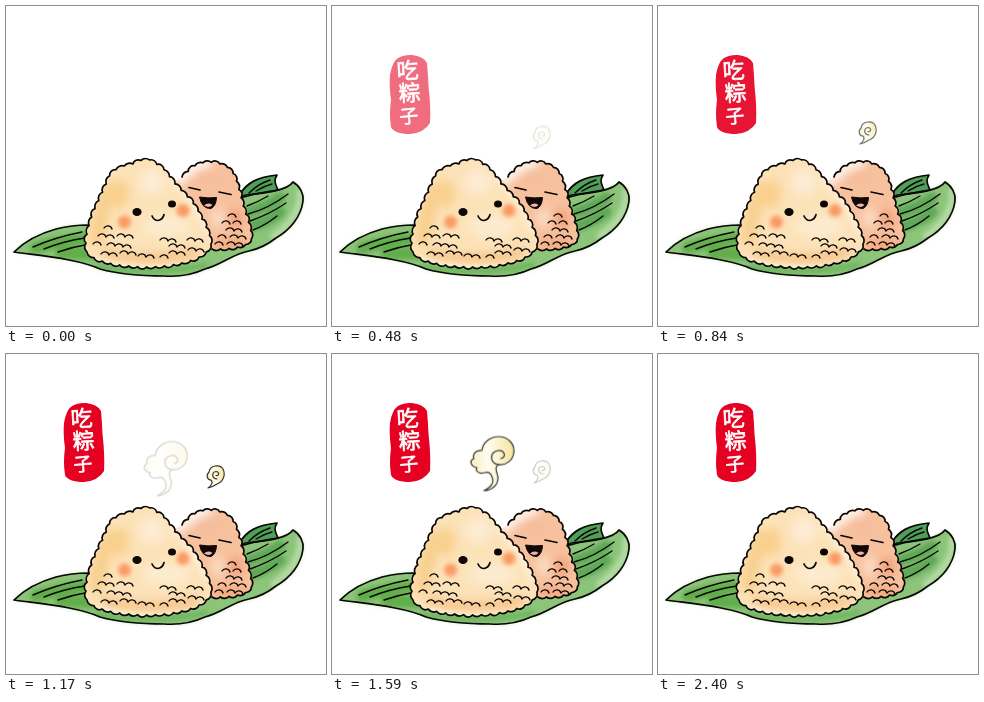
Write an HTML page that moves like this. It is 320 by 320 pixels and loops after 2730 ms.

```html
<!DOCTYPE html>
<html lang="zh">
<head>
<meta charset="utf-8">
<title>吃粽子</title>
<style>
  html, body { margin: 0; width: 100%; height: 100%; overflow: hidden; background: #fff; }
  svg { display: block; width: 100vw; height: 100vh; }
  .ink { fill: none; stroke: #080604; stroke-width: 1.7; stroke-linecap: round; stroke-linejoin: round; }
  .thin { stroke-width: 1.4; }
  .steam path { stroke: #3a372c; stroke-width: 1.2; stroke-linecap: round; stroke-linejoin: round; }
  .stamp text {
    font: 500 22px "Noto Sans CJK SC", "Noto Sans CJK", sans-serif;
    fill: #fff; stroke: #fff; stroke-width: .7; stroke-linejoin: round; text-anchor: middle;
  }
  .stamp, .steam { animation: 2730ms linear infinite both; }
  .stamp { animation-name: stamp; }
  .small { animation-name: small; }
  .big { animation-name: big; }
  @keyframes stamp {
    0%, 3.3% { opacity: 0; animation-timing-function: cubic-bezier(.3, .45, .65, .95); }
    38%, 100% { opacity: 1; }
  }
  @keyframes small {
    0%, 14.29% { opacity: 0; transform: translateY(9.5px); }
    37.36%, 48.35% { opacity: 1; }
    61.54%, 100% { opacity: 0; transform: translateY(-6.2px); }
  }
  @keyframes big {
    0%, 38.46% { opacity: 0; transform: translate(-1px, 11px); }
    58.24%, 74.73% { opacity: 1; }
    87.91%, 100% { opacity: 0; transform: translate(1px, -5px); }
  }
</style>
</head>
<body>
<svg viewBox="0 0 320 320">
  <defs>
    <filter id="soft" x="-50%" y="-50%" width="200%" height="200%"><feGaussianBlur stdDeviation="4"/></filter>
    <filter id="haze" x="-50%" y="-50%" width="200%" height="200%"><feGaussianBlur stdDeviation="2.2"/></filter>
    <linearGradient id="puff" x1="0" y1=".4" x2="1" y2=".3">
      <stop offset="0" stop-color="#f8f0c4"/><stop offset=".4" stop-color="#fffdf0"/><stop offset="1" stop-color="#f4e6a0"/>
    </linearGradient>
    <path id="leaf" d="M8 246 C18 236 32 228 50 223 C62 220 72 219 82 219 L200 225 L239 189 C258 187 281 185 287 176 C294 180 298 188 297 195 C295 211 284 224 270 232 C260 240 252 243 243 245 C226 248 216 259 199 263 C186 269 172 271 158 270 C136 270 112 268 94 263 C72 253 36 250 8 246Z"/>
    <path id="tip" d="M234 188 C241 177 251 171 271 169 C267 175 270 179 272 184 C258 186 248 188 238 191Z"/>
    <clipPath id="leafClip"><use href="#leaf"/></clipPath>
    <clipPath id="frontClip"><path id="frontArea"/></clipPath>
    <clipPath id="backClip"><path id="backArea"/></clipPath>
  </defs>
  <rect width="320" height="320" fill="#fff"/>

  <g id="leaves">
    <use href="#leaf" fill="#c6e6b6" filter="url(#haze)"/>
    <use href="#tip" fill="#4f9f58"/>
    <use href="#leaf" fill="#8cc47a"/>
    <g clip-path="url(#leafClip)">
      <g filter="url(#haze)" fill="none" stroke-linecap="round">
        <path d="M30 242 Q58 234 88 232M55 247 L92 248" stroke="#62ad4c" stroke-width="12"/>
        <path d="M244 206 Q260 202 274 192M246 220 Q262 216 274 206" stroke="#5fa856" stroke-width="11"/>
        <path d="M91 261 Q150 270 200 259" stroke="#6db45c" stroke-width="5"/>
        <path d="M294 186 Q296 210 268 230" stroke="#b4dba4" stroke-width="7"/>
      </g>
    </g>
    <use href="#tip" class="ink"/>
    <use href="#leaf" class="ink"/>
    <path class="ink thin" d="M27 241 Q50 231 76 226M38 243 Q58 235 79 232M52 246 Q66 241 79 239M243 187 Q252 178 264 174M250 185 Q258 180 266 178M241 200 Q252 196 262 190M242 208 Q262 203 282 188M244 215 Q264 208 280 197M247 224 Q260 219 271 210"/>
  </g>

  <g id="back">
    <g clip-path="url(#backClip)">
      <rect x="160" y="145" width="95" height="110" fill="#f7c19e"/>
      <g filter="url(#soft)">
        <path d="M170 178 Q186 157 206 155" fill="none" stroke="#fff8f2" stroke-width="10"/>
        <ellipse cx="204" cy="172" rx="14" ry="8" fill="#f5bd9c"/>
        <ellipse cx="212" cy="212" rx="8" ry="10" fill="#fbd9be"/>
        <ellipse cx="229" cy="213" rx="8" ry="10" fill="#f3a27c"/>
        <ellipse cx="224" cy="238" rx="18" ry="5" fill="#f2a67c"/>
      </g>
    </g>
    <path id="backLine" class="ink"/>
    <path class="ink" d="M183 181.5 L194 184M213 186 L225 188.5"/>
    <path d="M193.5 191 Q202 192.5 210.5 191.5 Q210 200 205 202.5 Q196 203 193.5 191Z" fill="#100706" stroke="#100706" stroke-linejoin="round"/>
    <path d="M198 199.5 Q202 196 206.5 199 Q203 202.5 198 199.5Z" fill="#f0b3a6"/>
    <path id="backRice" class="ink thin"/>
  </g>

  <g id="front">
    <g clip-path="url(#frontClip)">
      <rect x="70" y="140" width="145" height="130" fill="#fce2b8"/>
      <g filter="url(#soft)">
        <path d="M107 178 Q93 204 90 238" fill="none" stroke="#f8d090" stroke-width="16"/>
        <ellipse cx="114" cy="188" rx="9" ry="14" fill="#f9d08d"/>
        <ellipse cx="146" cy="176" rx="13" ry="13" fill="#fdebd3"/>
        <ellipse cx="160" cy="220" rx="24" ry="11" fill="#fdebce"/>
        <path d="M96 246 Q140 258 192 246" fill="none" stroke="#f6c084" stroke-width="8"/>
        <path d="M166 170 Q190 193 204 226" fill="none" stroke="#fff7ea" stroke-width="6"/>
      </g>
      <path d="M84 253 Q140 270 202 256" fill="none" stroke="#f6f2d6" stroke-width="4" filter="url(#haze)"/>
      <g filter="url(#haze)" fill="#fa9a64">
        <circle cx="118.5" cy="216" r="6.5"/>
        <circle cx="177" cy="204.5" r="6.5"/>
      </g>
    </g>
    <path id="frontLine" class="ink"/>
    <ellipse cx="131" cy="206" rx="4.6" ry="4" fill="#0b0705"/>
    <ellipse cx="166" cy="198" rx="4" ry="3.5" fill="#0b0705"/>
    <path class="ink" d="M146 210 Q148 214.5 152 214.5 Q157 213.5 158 208.5"/>
    <path id="frontRice" class="ink thin"/>
  </g>

  <g class="stamp">
    <path d="M66 52 Q72 48.5 80 49 Q91 50 95 57 Q96 68 96.5 80 Q99 102 98 117 Q92 127 78 128 Q62 128 59 121 Q57 108 59 94 Q57 80 58 69 Q60 56 66 52Z" fill="#e60021"/>
    <text transform="translate(76 72.5) rotate(-3)">吃</text>
    <text transform="translate(78 95) rotate(-3)">粽</text>
    <text transform="translate(77.5 117) rotate(-5) scale(.86)">子</text>
  </g>

  <g class="steam small">
    <path fill="url(#puff)" d="M202 134 C206 131 207 128 205 126 C201 126 200 121 203 118 C204 111 214 110 217 115 C220 121 217 128 211 130 C208 132 205 133.5 202 134Z"/>
    <path fill="none" d="M211 125 C206 125 205 118 210 117.5 C214 118 213 122 210 121.5"/>
  </g>
  <g class="steam big">
    <path fill="url(#puff)" d="M152 132 C159 129 163 124 160 118 C159 114 156 113 153 114 C147 116 143 112 145 109 C139 108 137 102 142 100 C140 95 145 91 150 92 C151 84 158 78 167 78 C177 78 183 86 182 94 C181 102 174 107 167 106 C162 108 165 113 166 118 C167 126 160 132 152 132Z"/>
    <path fill="none" d="M167 106 C158 105 157 94 166 92 C173 91 175 99 169 100"/>
  </g>
</svg>
<script>
  const $ = id => document.getElementById(id);
  const set = (id, d) => $(id).setAttribute("d", d);

  // Replace a smooth contour with a chain of rounded grains.
  function scallop(name, d, size, close = "") {
    const guide = document.createElementNS("http://www.w3.org/2000/svg", "path");
    guide.setAttribute("d", d);
    const length = guide.getTotalLength();
    const count = Math.round(length / size);
    let out = "";
    for (let i = 0; i <= count; i++) {
      const p = guide.getPointAtLength(length * i / count);
      const r = size * (.72 + .1 * Math.sin(i * 2.3));
      out += (i ? `A${r} ${r} 0 0 1 ` : "M") + `${p.x.toFixed(1)} ${p.y.toFixed(1)}`;
    }
    set(name + "Area", out + close + "Z");
    set(name + "Line", out);
  }

  // Each row holds x, y and the number of grains.
  const rice = (id, rows) => set(id, rows.map(([x, y, n]) =>
    `M${x} ${y}` + "a4.4 4.4 0 0 1 8 1".repeat(n)).join(""));

  scallop("back", "M176 171 C182 166 186 161 192 158 C204 154 217 157 225 164 C232 174 234 190 239 206 C243 218 247 228 245 235 C238 242 220 243 206 243", 8.5, "L165 205L168 176");
  scallop("front", "M81 246 C78 236 82 222 87 207 C93 194 98 184 103 171 C108 161 121 159 132 157 C135 152 145 152 147 157 C155 159 160 165 165 173 C173 184 186 193 192 205 C198 218 205 228 205 238 C202 251 180 259 145 261 C115 261 88 256 81 246Z", 9);

  rice("frontRice", [
    [98, 222, 1], [92, 230, 2], [111, 230, 2], [87, 238, 1], [101, 239, 3],
    [95, 248, 2], [114, 247, 2], [132, 250, 2],
    [154, 234, 2], [163, 240, 2], [181, 234, 2],
    [154, 251, 1], [163, 247, 2], [182, 244, 2]
  ]);
  rice("backRice", [
    [222, 210, 1], [216, 217, 1], [227, 217, 1], [220, 224, 2],
    [212, 231, 1], [224, 231, 2], [209, 238, 1], [221, 238, 2]
  ]);
</script>
</body>
</html>
```
